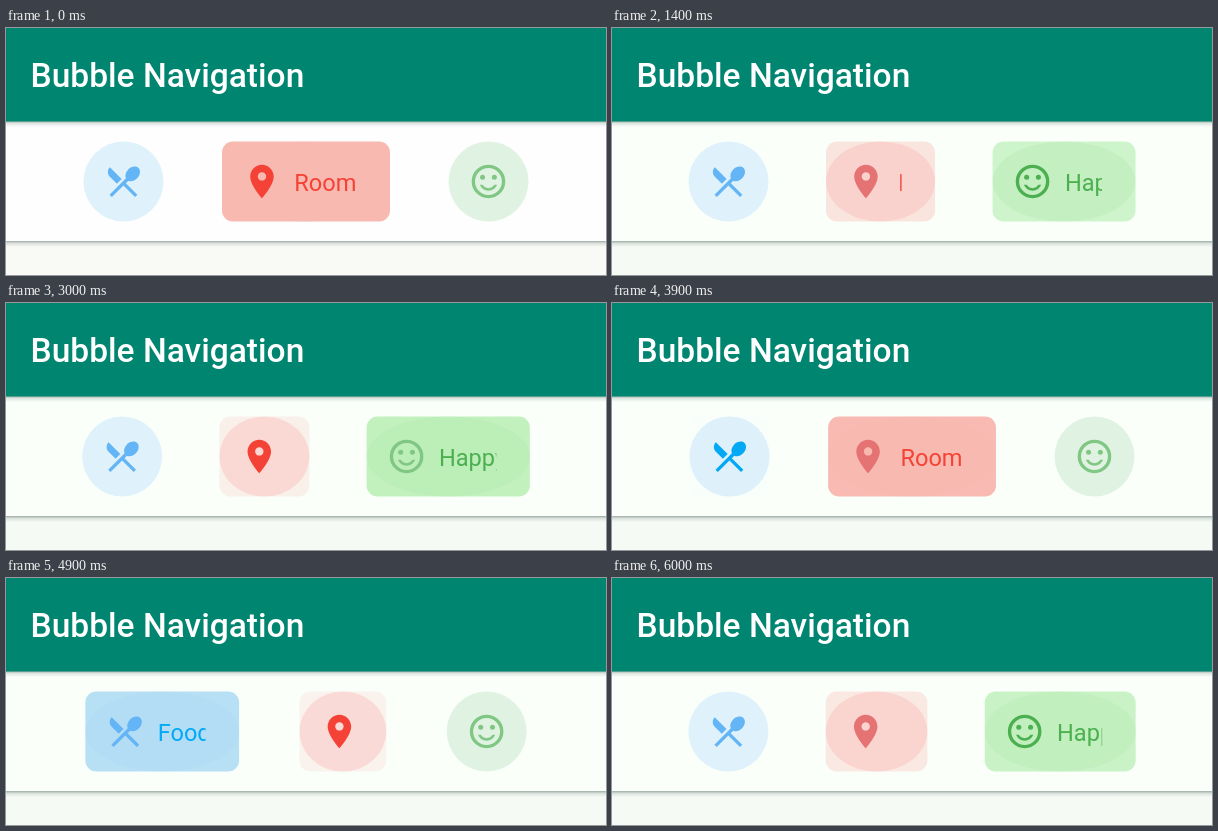
These frames come from a looping animation (600x247 px, 6100 ms). An HTML page:

```html
<!DOCTYPE html>
<html lang="en">
<head>
<meta charset="utf-8">
<title>Bubble Navigation</title>
<style>
  html, body { margin: 0; width: 100%; height: 100%; overflow: hidden; background: #f6faf5; }
  svg { display: block; width: 600px; height: 247px; font-family: Roboto, sans-serif; }
  .title { font-size: 33.5px; font-weight: 500; fill: #fff; }
  .label { font-size: 23.6px; }
</style>
</head>
<body>
<svg viewBox="0 0 600 247">
  <defs>
    <linearGradient id="shade" x2="0" y2="1">
      <stop offset="0" stop-color="#46605a" stop-opacity=".5"/>
      <stop offset=".4" stop-color="#46605a" stop-opacity=".16"/>
      <stop offset="1" stop-color="#46605a" stop-opacity="0"/>
    </linearGradient>
  </defs>
  <rect id="page" width="600" height="247"/>
  <rect id="bar" y="93" width="600" height="120"/>
  <rect y="213" width="600" height="6" fill="url(#shade)"/>
  <rect y="93" width="600" height="6" fill="url(#shade)"/>
  <rect width="600" height="93.5" fill="#008570"/>
  <text class="title" x="24.5" y="59">Bubble Navigation</text>
  <g id="items"></g>
</svg>
<script>
const LOOP = 6100, STEP = 100, DURATION = 500;
const SIZE = 80, PAD = 19, TEXT_X = 72.3, TEXT_END = 33.5;

const ITEMS = [
  { label: 'Food', full: 160, on: '#03a9f4', off: '#64b5f6', light: '#dff1fa', strong: '#aadaf4',
    icon: '<path d="M8.1 13.34l2.83-2.83L3.91 3.5c-1.56 1.56-1.56 4.09 0 5.66l4.19 4.18zm6.78-1.81c1.53.71 3.68.21 5.27-1.38 1.91-1.91 2.28-4.65.81-6.12-1.46-1.46-4.2-1.1-6.12.81-1.59 1.59-2.09 3.74-1.38 5.27L3.7 19.87l1.41 1.41L12 14.41l6.88 6.88 1.41-1.41L13.41 13z"/>' },
  { label: 'Room', full: 168, on: '#f44336', off: '#e57373', light: '#fae1de', strong: '#f8b9b1',
    icon: '<path d="M12 2C8.13 2 5 5.13 5 9c0 5.25 7 13 7 13s7-7.75 7-13c0-3.87-3.13-7-7-7zm0 9.5a2.5 2.5 0 0 1 0-5 2.5 2.5 0 0 1 0 5z"/>' },
  { label: 'Happy', full: 174, on: '#4caf50', off: '#81c784', light: '#e0f3e2', strong: '#b2eeae',
    icon: '<circle cx="12" cy="12" r="9" fill="none" stroke="currentColor" stroke-width="2"/><circle cx="8.5" cy="9.5" r="1.5"/><circle cx="15.5" cy="9.5" r="1.5"/><path d="M12 16c-1.48 0-2.75-.81-3.45-2H6.88c.8 2.05 2.79 3.5 5.12 3.5s4.32-1.45 5.12-3.5h-1.67c-.7 1.19-1.97 2-3.45 2z"/>' }
];

// Taps: [time, selected item]
const TAPS = [[-1000, 1], [1095, 2], [2890, 1], [3888, 0], [4810, 1], [5665, 2]];

const byId = id => document.getElementById(id);

byId('items').innerHTML = ITEMS.map((it, i) => `
  <g>
    <ellipse cy="153.5" ry="40" fill="${it.light}"/>
    <rect y="113.5" height="80" rx="11" fill="${it.strong}"/>
    <g class="icon" fill="currentColor" transform="translate(19.8 133.3) scale(1.68)">${it.icon}</g>
    <clipPath id="clip${i}"><rect x="${TEXT_X}" y="130" height="50"/></clipPath>
    <text class="label" x="${TEXT_X}" y="162.5" fill="${it.on}" clip-path="url(#clip${i})">${it.label}</text>
  </g>`).join('');

ITEMS.forEach((it, i) => {
  const g = it.group = byId('items').children[i];
  it.oval = g.querySelector('ellipse');
  it.box = g.querySelector('rect');
  it.glyph = g.querySelector('.icon');
  it.clip = g.querySelector('clipPath rect');
});

const ease = k => (1 - Math.cos(Math.PI * k)) / 2;
const mix = (a, b, k) => `rgb(${a.map((v, i) => Math.round(v + (b[i] - v) * k))})`;

function draw(t) {
  const n = TAPS.filter(tap => tap[0] <= t).length - 1;
  const [start, active] = TAPS[n];
  const previous = n ? TAPS[n - 1][1] : -1;
  const k = Math.min((t - start) / DURATION, 1);

  const fades = ITEMS.map((_, i) => i === active ? k : i === previous ? 1 - k : 0);
  const widths = ITEMS.map((it, i) => SIZE + (it.full - SIZE) * ease(fades[i]));
  const gap = (600 - 2 * PAD - widths.reduce((a, b) => a + b)) / 4;

  let x = PAD + gap;
  ITEMS.forEach((it, i) => {
    const w = widths[i];
    it.group.setAttribute('transform', `translate(${x.toFixed(2)} 0)`);
    it.oval.setAttribute('cx', w / 2);
    it.oval.setAttribute('rx', w / 2);
    it.box.setAttribute('width', w);
    it.box.setAttribute('opacity', fades[i]);
    it.glyph.style.color = i === active ? it.on : it.off;
    it.clip.setAttribute('width', Math.max(0, w - TEXT_END - TEXT_X));
    x += w + gap;
  });

  const tint = Math.min(t / 700, 1);
  byId('bar').setAttribute('fill', mix([253, 254, 253], [250, 255, 250], tint));
  byId('page').setAttribute('fill', mix([249, 249, 245], [246, 250, 245], tint));
}

const origin = performance.now();
function tick() {
  const t = (performance.now() - origin) % LOOP;
  draw(Math.floor(t / STEP) * STEP);
  requestAnimationFrame(tick);
}
tick();
</script>
</body>
</html>
```
